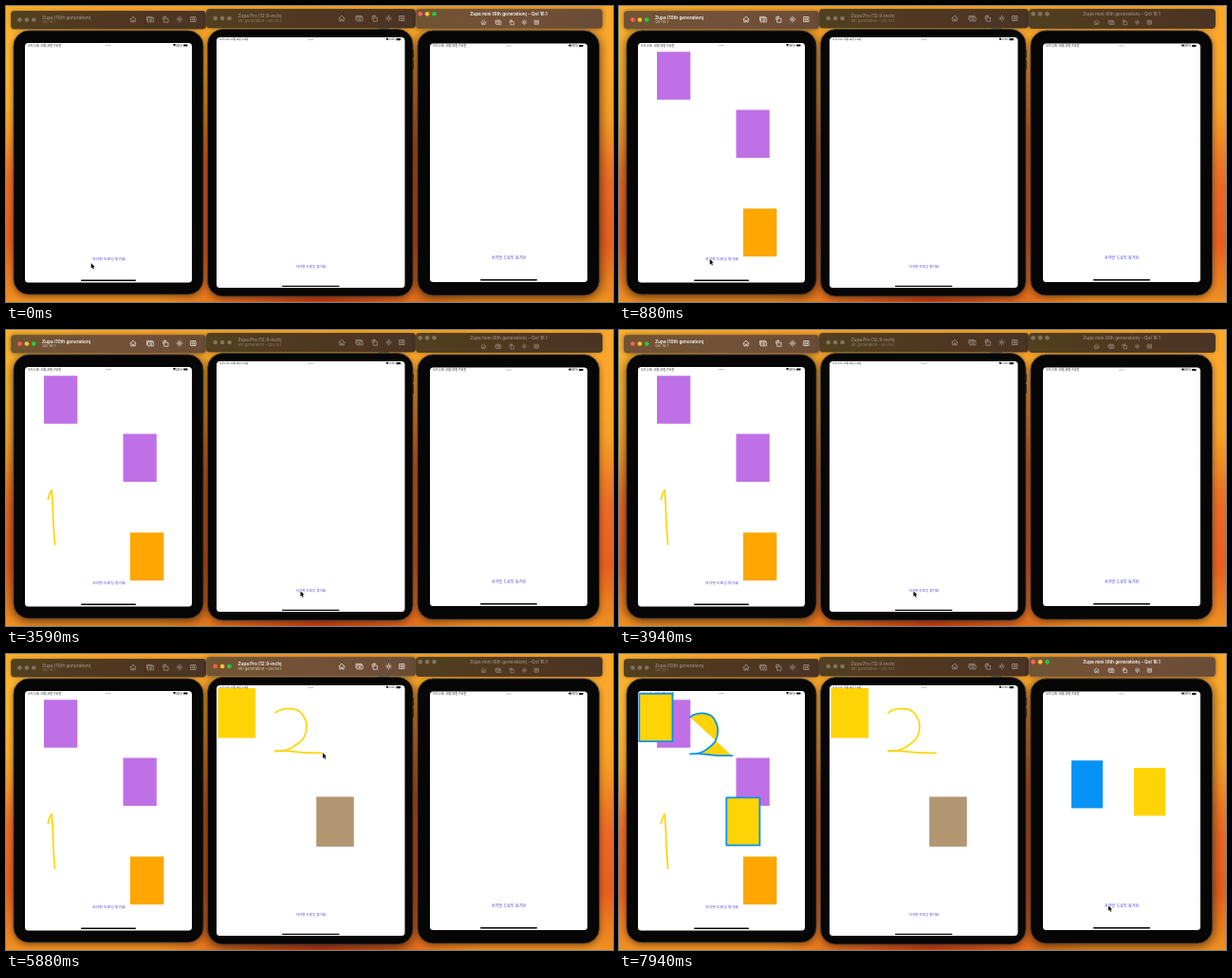
An HTML page with a canvas that plays this animation: 640 by 312 pixels, repeating every 8000 ms.

```html
<!DOCTYPE html>
<html lang="ko">
<meta charset="utf-8">
<style>
html, body { margin: 0; width: 100%; height: 100%; overflow: hidden; background: #f08a1c; }
canvas { display: block; width: 640px; height: 312px; }
</style>
<canvas></canvas>
<script>
const canvas = document.querySelector('canvas');
const c = canvas.getContext('2d');
const dpr = window.devicePixelRatio || 1;
canvas.width = 640 * dpr;
canvas.height = 312 * dpr;

const LOOP = 8000;
const YELLOW = '#ffd406', BLUE = '#0593f5', PURPLE = '#c070e6', ORANGE = '#ffa600', BROWN = '#b39672';
const FONT = '"Noto Sans CJK KR", "Noto Sans CJK", "Noto Sans", sans-serif';
const TITLE_FONT = 'Inter, sans-serif';

// Boxes are [x, y, w, h]; shapes are [time, x, y, colour].
const tablets = [
  { body: [8, 26, 200, 278], screen: [20, 39, 176, 252.5], bar: [5, 5, 206, 19.5], lights: [14.5, 14.5],
    title: 'Zupa (10th generation)', sub: 'Qel 16.1', titleAt: [38, 13.6], subAt: [38, 18.4],
    icons: [134, 152, 168.5, 183, 197.5], iconY: 14, iconSize: 1,
    words: [91, 103, 115], wordY: 267.8, wordSize: 3.9, home: [79, 58, 289.3],
    size: [35.3, 50.5], shapes: [[590, 40, 48.3, PURPLE], [730, 123.5, 109.6, PURPLE], [860, 131, 213.5, ORANGE]],
    active: t => t >= 170 && t < 4060 },
  { body: [212.5, 24.5, 216.5, 281.5], screen: [222, 33, 198.5, 264], bar: [211, 3, 221, 20.5], lights: [220.7, 13],
    title: 'Zupa Pro (12.9-inch)', sub: '6th generation – Qel 16.1', titleAt: [244.5, 12.3], subAt: [244.5, 17.3],
    icons: [354, 372.5, 389, 403.5, 417.5], iconY: 13, iconSize: 1,
    words: [305.7, 316.6, 327.4], wordY: 276, wordSize: 3.5, home: [291, 60.5, 295.4],
    size: [39.6, 52.6], shapes: [[4180, 223.5, 36, YELLOW], [4300, 327.2, 150.5, BROWN]],
    active: t => t >= 4060 && t < 7600 },
  { body: [434, 26, 191.5, 279], screen: [447, 39.5, 166, 251.5], bar: [432, 3, 197, 21], lights: [436.7, 8.3],
    title: 'Zupa mini (6th generation) – Qel 16.1', titleAt: [530, 10.2],
    icons: [503.5, 519, 533.5, 546.5, 559.5], iconY: 17.2, iconSize: .8,
    words: [512, 524.5, 537], wordY: 266.7, wordSize: 4, home: [500, 60, 288.7],
    size: [33, 50.4], shapes: [[7740, 477, 112.2, BLUE], [7880, 543, 120, YELLOW]],
    active: t => t < 170 || t >= 7600 }
];

// Samples a smooth curve through the points.
function spline(pts, steps = 12) {
  const out = [pts[0]];
  for (let i = 0; i < pts.length - 1; i++) {
    const [a, b, d, e] = [-1, 0, 1, 2].map(k => pts[Math.min(Math.max(i + k, 0), pts.length - 1)]);
    for (let s = 1; s <= steps; s++) {
      const u = s / steps;
      out.push([0, 1].map(k => b[k] + .5 * u * (d[k] - a[k] +
        u * (2 * a[k] - 5 * b[k] + 4 * d[k] - e[k] + u * (3 * (b[k] - d[k]) + e[k] - a[k])))));
    }
  }
  return out;
}

const oneHook = spline([[44.3, 178.5], [46, 172.5], [48.2, 169]]);
const oneStem = spline([[48.2, 169], [49.3, 186], [50, 205], [51.6, 226]]);
const twoBow = spline([[284, 62], [289, 59], [300, 57.6], [310.5, 61.5], [316.8, 74], [314, 88], [304, 97], [294, 101.5], [284, 102.4]]);
const twoBase = spline([[284, 102.4], [296, 102.2], [315, 104], [334, 104.3]]);
const strokes = [
  { pts: oneHook, from: 1410, to: 1520 }, { pts: oneStem, from: 1520, to: 1840 },
  { pts: twoBow, from: 5110, to: 5650 }, { pts: twoBase, from: 5710, to: 5880 }
];

const cursorPath = [
  [0, 89.7, 271], [60, 89.7, 271], [290, 95.7, 266.8], [950, 95.7, 266.8], [1060, 107, 267], [1350, 44.3, 178.5],
  [1840, 51.6, 226], [1900, 51.6, 226], [2060, 121, 229], [2290, 121, 229], [2650, 273, 266], [3000, 273, 266],
  [3590, 310.5, 275.3], [4320, 310.5, 275.3], [4530, 323.2, 275.3], [4880, 323.2, 275.3], [5080, 284, 62],
  [5880, 334, 104.3], [6060, 334, 104.3], [6410, 334, 275.8], [7240, 334, 275.8], [7560, 516, 265.2], [8000, 516, 265.2]
];

const ease = u => u * u * (3 - 2 * u);

function cursorAt(t) {
  const s = strokes.find(s => t >= s.from && t < s.to);
  if (s) return s.pts[Math.round((t - s.from) / (s.to - s.from) * (s.pts.length - 1))];
  if (t >= 5080 && t < 5110) return twoBow[0];
  if (t >= 5650 && t < 5710) return twoBase[0];
  if (t >= 1350 && t < 1410) return oneHook[0];
  const i = cursorPath.findIndex(p => p[0] > t);
  const [a, b] = [cursorPath[i - 1], cursorPath[i]];
  const u = ease((t - a[0]) / (b[0] - a[0]));
  return [a[1] + (b[1] - a[1]) * u, a[2] + (b[2] - a[2]) * u];
}

function box([x, y, w, h], r, fill) {
  c.beginPath();
  c.roundRect(x, y, w, h, r);
  c.fillStyle = fill;
  c.fill();
}

function dot(x, y, r, fill) {
  c.beginPath();
  c.arc(x, y, r, 0, 7);
  c.fillStyle = fill;
  c.fill();
}

function text(str, x, y, font, fill, align = 'left') {
  c.font = font;
  c.fillStyle = fill;
  c.textAlign = align;
  c.fillText(str, x, y);
}

function trace(pts) {
  pts.forEach(([x, y]) => c.lineTo(x, y));
}

function glow(x, y, r, rgb, alpha) {
  const g = c.createRadialGradient(x, y, 0, x, y, r);
  g.addColorStop(0, `rgba(${rgb},${alpha})`);
  g.addColorStop(1, `rgba(${rgb},0)`);
  c.fillStyle = g;
  c.fillRect(0, 0, 640, 312);
}

function drawWallpaper() {
  const g = c.createLinearGradient(0, 0, 0, 312);
  [[0, '#f9a62a'], [.35, '#f39a24'], [.6, '#e96a25'], [.8, '#e5601f'], [1, '#ee9122']].forEach(s => g.addColorStop(...s));
  c.fillStyle = g;
  c.fillRect(0, 0, 640, 312);
  glow(0, 60, 110, '255,190,50', .8);
  glow(330, 310, 170, '196,52,20', .9);
  glow(430, 150, 120, '190,60,20', .7);
  glow(210, 170, 100, '210,80,25', .7);
  glow(640, 50, 110, '255,170,45', .7);
}

function drawIcons(d, color) {
  const draws = [
    'M-3 0L0-3L3 0M-2.2-.6V3H-.7V1H.7V3H2.2V-.6',
    'M-3.5 1.4V-2.6H2.3V-1.3M-2.2-1.3H3.6V2.8H-2.2ZM-.3.8A1 1 0 1 0 1.7.8A1 1 0 1 0-.3.8',
    'M-1.4-.8H2.5V3.2H-1.4ZM-2.8.4V-2.4H.2M-.8-3.4L.3-2.4L-.8-1.4',
    'M-1.2 0A1.2 1.2 0 1 0 1.2 0A1.2 1.2 0 1 0-1.2 0M0-3V-2.3M0 3V2.3M-3 0H-2.3M3 0H2.3M-2-2L-1.6-1.6M2 2L1.6 1.6M-2 2L-1.6 1.6M2-2L1.6-1.6',
    'M-2.5-2.5H2.5V2.5H-2.5ZM-1-1H1V1H-1Z'
  ];
  c.strokeStyle = color;
  c.lineWidth = .75;
  draws.forEach((p, i) => {
    c.save();
    c.translate(d.icons[i], d.iconY);
    c.scale(d.iconSize, d.iconSize);
    c.stroke(new Path2D(p));
    c.restore();
  });
}

function drawBar(d, on) {
  const [x, y, w, h] = d.bar;
  const g = c.createLinearGradient(x, 0, x + w, 0);
  (on ? ['#705431', '#735139', '#6a4c36'] : ['#51401f', '#503720', '#4a3424']).forEach((s, i) => g.addColorStop(i / 2, s));
  c.save();
  c.shadowColor = `rgba(0,0,0,${on ? .45 : .25})`;
  c.shadowBlur = 5 * dpr;
  box([x, y, w, h], 4, g);
  c.restore();
  c.strokeStyle = on ? 'rgba(255,235,205,.22)' : 'rgba(255,235,205,.1)';
  c.lineWidth = .5;
  c.stroke();
  const off = '#82725e';
  ['#ff5f57', '#febc2e', '#28c840'].forEach((k, i) => dot(d.lights[0] + i * 7.4, d.lights[1], 2.35, on ? k : off));
  const ink = on ? '#fff' : '#98897a';
  text(d.title, ...d.titleAt, `600 4.7px ${TITLE_FONT}`, ink, d.sub ? 'left' : 'center');
  if (d.sub) text(d.sub, ...d.subAt, `4px ${TITLE_FONT}`, on ? '#d8cdc0' : '#8b7c6c');
  drawIcons(d, on ? '#eee6dc' : '#a3968a');
}

function drawStatus([x, y, w], small) {
  const top = y + (small ? 3.2 : 3.5), size = small ? 2.6 : 3;
  text('오후 2:06  10월 26일 수요일', x + 3, top, `500 ${size}px ${FONT}`, '#222');
  for (const k of [-2, 0, 2]) dot(x + w / 2 + k, top - 1, .55, '#777');
  const right = x + w - 4;
  box([right - 5, top - 2.1, 4.6, 2.1], .7, '#111');
  text('100%', right - 6, top, `500 ${size}px ${FONT}`, '#222', 'right');
  c.beginPath();
  c.moveTo(right - 14.5, top);
  c.arc(right - 14.5, top, 2.4, -2.3, -.84);
  c.fillStyle = '#111';
  c.fill();
}

function drawTablet(d, i, on, t) {
  c.save();
  c.shadowColor = `rgba(20,5,0,${on ? .75 : .5})`;
  c.shadowBlur = (on ? 12 : 7) * dpr;
  c.shadowOffsetY = 2 * dpr;
  box(d.body, 16, '#060606');
  c.restore();
  c.strokeStyle = '#4a443f';
  c.lineWidth = .8;
  c.stroke();
  box(d.screen, 3.5, '#fff');
  d.shapes.forEach(([time, x, y, fill]) => {
    if (t >= time) box([x, y, ...d.size], 0, fill);
  });
  drawStatus(d.screen, i === 1);
  ['사각형', '드로잉', '동기화'].forEach((w, k) =>
    text(w, d.words[k], d.wordY, `500 ${d.wordSize}px ${FONT}`, '#4436d6'));
  const [x, w, y] = d.home;
  box([x, y - .7, w, 1.4], .7, '#000');
}

function drawStrokes(t) {
  c.strokeStyle = YELLOW;
  c.lineWidth = 1.7;
  for (const s of strokes) {
    if (t < s.from) continue;
    const n = Math.round(Math.min(1, (t - s.from) / (s.to - s.from)) * (s.pts.length - 1));
    c.beginPath();
    trace(s.pts.slice(0, n + 1));
    c.stroke();
  }
}

// Copies the middle tablet's drawing to the left one, scaled screen to screen.
function drawSynced() {
  const [to, from] = tablets.map(d => d.screen);
  const map = ([x, y]) => [to[0] + (x - from[0]) * to[2] / from[2], to[1] + (y - from[1]) * to[3] / from[3]];
  const [w, h] = tablets[1].size;
  const outlines = tablets[1].shapes.map(([, x, y]) => [[x, y], [x + w, y], [x + w, y + h], [x, y + h]]);
  c.fillStyle = YELLOW;
  c.strokeStyle = BLUE;
  c.lineWidth = 1.8;
  [...outlines, [...twoBow, ...twoBase]].forEach((pts, i) => {
    c.beginPath();
    trace(pts.map(map));
    if (i < outlines.length) c.closePath();
    c.fill();
    c.stroke();
  });
}

function drawCursor([x, y]) {
  c.save();
  c.translate(x, y);
  const arrow = new Path2D('M0 0V5.6L1.3 4.4L2.2 6.5L3.2 6.1L2.3 4H4Z');
  c.strokeStyle = '#fff';
  c.lineWidth = 1;
  c.stroke(arrow);
  c.fillStyle = '#000';
  c.fill(arrow);
  c.restore();
}

function draw(t) {
  c.setTransform(dpr, 0, 0, dpr, 0, 0);
  c.lineCap = c.lineJoin = 'round';
  drawWallpaper();
  box([392, 23.5, 12, 2], 1, '#1c1a19');
  box([428, 46, 2, 9], 1, '#25201d');
  box([428, 57, 2, 10], 1, '#25201d');
  tablets.forEach((d, i) => drawTablet(d, i, d.active(t), t));
  tablets.forEach(d => drawBar(d, d.active(t)));
  drawStrokes(t);
  if (t >= 7060) drawSynced();
  drawCursor(cursorAt(t));
}

const start = performance.now();
function tick() {
  draw((performance.now() - start) % LOOP);
  requestAnimationFrame(tick);
}
tick();
</script>
</html>
```
